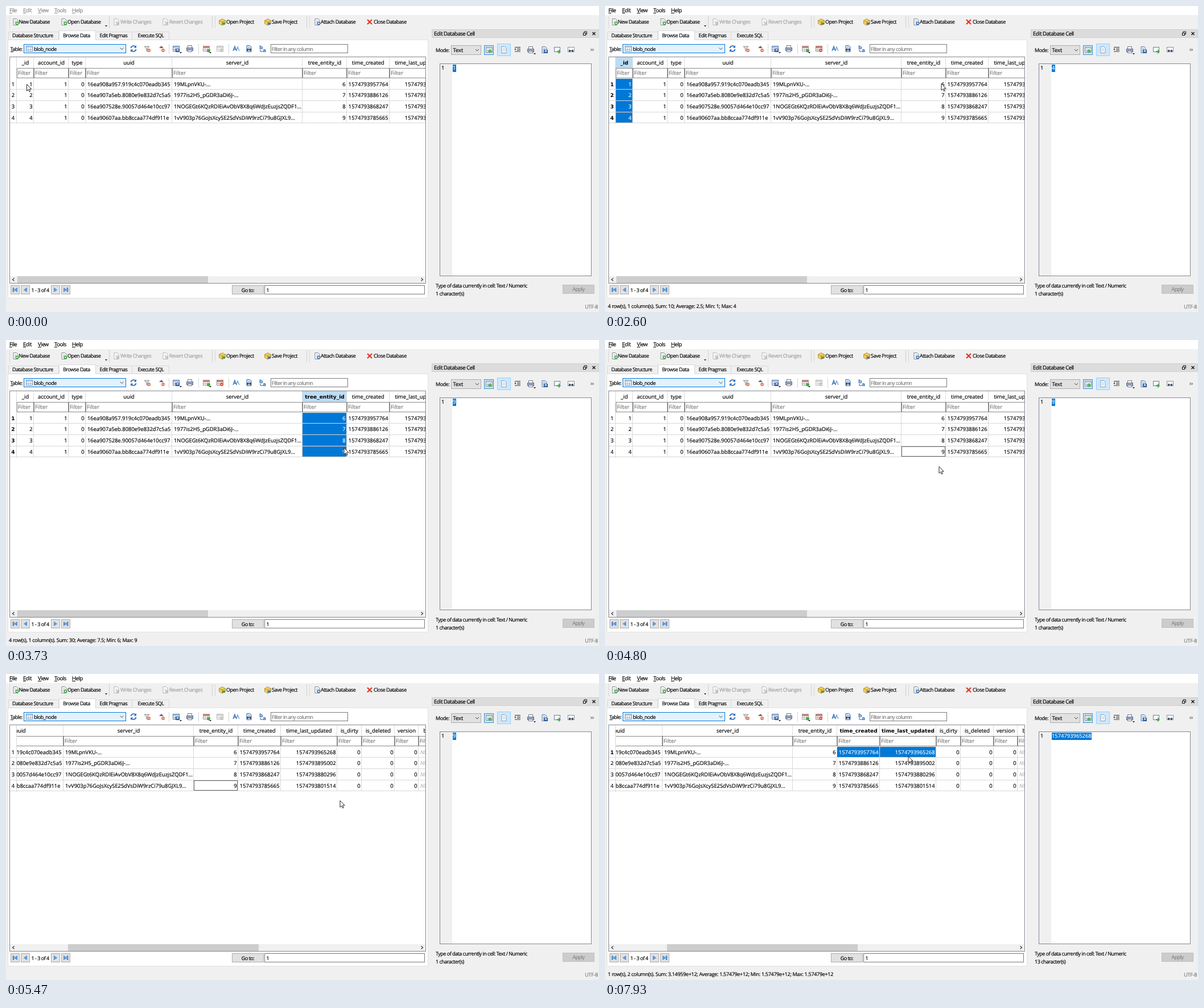
Write an HTML page that moves like this. It is 1042x538 px and loops after 8000 ms.

```html
<!DOCTYPE html>
<html lang="en">
<head>
<meta charset="utf-8">
<title>Database browser</title>
<style>
html, body { margin: 0; width: 100%; height: 100%; overflow: hidden; background: #f0f0f0; }
svg { display: block; width: 1042px; height: 538px; }
rect { shape-rendering: crispEdges; }
text { font: 9px "Open Sans", "Noto Sans", sans-serif; letter-spacing: -.5px; text-rendering: geometricPrecision; white-space: pre; stroke-width: .18px; }
.cell { font-size: 9.4px; letter-spacing: 0; }
.bold { font: bold 9px "DejaVu Sans", sans-serif; letter-spacing: 0; stroke-width: 0; }
.null { font-style: italic; }
.title { font-size: 9.6px; }
.status { letter-spacing: -.3px; }
</style>
</head>
<body>
<svg viewBox="0 0 1042 538">
  <defs><clipPath id="view"><rect x="19" y="90" width="718" height="385"/></clipPath></defs>
  <g id="base"></g>
  <g id="live"></g>
</svg>
<script>
const BLUE = '#0078d7', GREY = '#a0a0a0', FPS = 15, LOOP = 8000;

const box = (x, y, w, h, fill, line) => line
  ? `<rect x="${x + .5}" y="${y + .5}" width="${w - 1}" height="${h - 1}" fill="${fill}" stroke="${line}"/>`
  : `<rect x="${x}" y="${y}" width="${w}" height="${h}" fill="${fill}"/>`;
const label = (x, y, s, { fill = '#000', anchor = 'start', cls = '' } = {}) =>
  `<text x="${x}" y="${y + 3.4}" fill="${fill}" stroke="${fill}" text-anchor="${anchor}" class="${cls}">${s}</text>`;
const path = (d, line, width = 1, fill = 'none') =>
  `<path d="${d}" fill="${fill}" stroke="${line}" stroke-width="${width}"/>`;
const disc = (x, y, r, fill) => `<circle cx="${x}" cy="${y}" r="${r}" fill="${fill}"/>`;
const at = (x, y, body) => `<g transform="translate(${x} ${y})">${body}</g>`;
const chevron = (x, y) => path(`M${x - 3} ${y - 1.5}l3 3 3-3`, '#444');
const tri = (x, y) => path(`M${x - 2} ${y}h4l-2 2.5z`, 'none', 0, '#222');

// Icons, centred on 0,0
const page = (line = '#6b7f99', fill = '#fff') =>
  path('M-4-5.5h5.5l2.5 2.5v8.5h-8z', line, 1, fill) + path('M-2-2h4M-2 0h4M-2 2h4', line, .6);
const dbPage = mark => page('#7a8794') + disc(2.5, 2.5, 3, mark) + path('M1 2.5h3M2.5 1v3', '#fff', .9);
const cube = mark => path('M-5.5-2.5l5.5-3 5.5 3v5.5l-5.5 3-5.5-3z', '#a98222', .8, '#f5cf5a') +
  path('M-5.5-2.5l5.5 2.5 5.5-2.5M0 0v6', '#a98222', .8) + box(0, 1, 5, 4, mark);
const grid = (line, head) => box(-6, -5, 12, 10, '#fff', line) + box(-5, -4, 10, 3, head) +
  path('M-5 1.5h10M-2-1v5M2-1v5', line, .7);
const disk = box(-1, 0, 7, 6, '#4a78b8', '#2c5693') + box(1, 1, 3, 2, '#fff');
const printer = box(-6, -2, 12, 6, '#93a6c2', '#5a7093') + box(-4, -6, 8, 5, '#fff', '#778') + box(-4, 2, 8, 4, '#fff', '#778');
const funnel = path('M-5-4h9l-3.5 4v5l-2-1.5v-3.5z', '#777', .8, '#ddd');
const cross = path('M-4-4l8 8M4-4l-8 8', '#e03324', 2.2);
const refresh = path('M-4.5-1a4.7 4.7 0 0 1 8-2.5M4.5 1a4.7 4.7 0 0 1-8 2.5', '#2f6fbd', 1.8) +
  path('M5-6v4.5h-4.5zM-5 6v-4.5h4.5z', 'none', 0, '#2f6fbd');
const minus = color => disc(3, 3, 3, color) + path('M1.3 3h3.4', '#fff', 1);
const glasses = box(-4, 0, 3, 4, '#456') + box(1, 0, 3, 4, '#456') + box(-1, 1, 2, 1, '#456');

const columns = [
  ['_id', 19, 1], ['account_id', 49, 1], ['type', 110, 1], ['uuid', 140], ['server_id', 292],
  ['tree_entity_id', 521, 1], ['time_created', 599, 1], ['time_last_updated', 674, 1],
  ['is_dirty', 773, 1], ['is_deleted', 816, 1], ['version', 874, 1], ['blob_size', 916], ['', 973]
].map(([name, x, numeric], i, all) => ({ name, x, numeric, w: (all[i + 1] || [])[1] - x })).slice(0, -1);

const rows = [
  ['16ea908a957.919c4c070eadb345', '19MLpnVKU-...', 1574793957764, 1574793965268],
  ['16ea907a5eb.8080e9e832d7c5a5', '1977is2H5_pGDR3aDi6J-...', 1574793886126, 1574793895002],
  ['16ea907528e.90057d464e10cc97', '1NOGEGt6KQzRDlEiAvObV8X8q6WdJzEuzjsZQDF1...', 1574793868247, 1574793880296],
  ['16ea90607aa.bb8ccaa774df911e', '1vV903p76GoJsXcySE2SdVsDiW9rzCi79u8GJXL9...', 1574793785665, 1574793801514]
].map(([uuid, server, created, updated], i) => [i + 1, 1, 0, uuid, server, i + 6, created, updated, 0, 0, 0, null]);
const rowTop = r => Math.round(127.6 + r * 19.7);

// Selection steps: frame, first column, last column, last row (-1 = nothing selected)
const picks = [
  [0, 0, 0, -1], [12, 0, 0, 0], [15, 0, 0, 1], [17, 0, 0, 2], [20, 0, 0, 3],
  [45, 5, 5, 0], [50, 5, 5, 1], [53, 5, 5, 2], [56, 5, 5, 3], [72, 5, 5, -1],
  [113, 6, 6, 0], [117, 6, 7, 0]
];
// Pointer: frame, x, y, linear approach
const pointer = [
  [0, 36, 137], [12, 36, 137], [19, 38.5, 189, 1], [23, 37, 220, 1], [30, 37, 220], [39, 590.5, 136],
  [47, 590.5, 136], [56, 593.5, 189], [62, 593.5, 189], [65, 586.5, 222], [85, 586.5, 222], [96, 461, 137],
  [99, 461, 137], [100, 458, 136], [102, 453, 132], [106, 507, 139], [110, 465, 139],
  [115, 465, 139], [119, 532.5, 144]
];
const scroll = [[76, 0], [77, 26], [78, 66], [79, 110], [80, 151], [81, 179], [82, 191]];

function follow(keys, frame, i, linear) {
  const n = keys.findIndex(k => k[0] > frame);
  if (n === 0) return keys[0][i];
  if (n < 0) return keys[keys.length - 1][i];
  const a = keys[n - 1], b = keys[n];
  let p = (frame - a[0]) / (b[0] - a[0]);
  if (!(linear || b[3])) p = p * p * (3 - 2 * p);
  return a[i] + (b[i] - a[i]) * p;
}

function base() {
  let s = box(0, 0, 1042, 538, '#f0f0f0') + box(0, 0, 1042, 16, '#fff');
  const tools = [
    [17, 22.5, 'New Database', dbPage('#4aa84a')], [102, 108, 'Open Database', dbPage('#4aa84a')],
    [194, 201, 'Write Changes', page('#b5b5b5') + box(0, 0, 5, 5, '#c4c4c4'), GREY],
    [280, 287, 'Revert Changes', page('#b5b5b5') + path('M0 0l5 5M5 0l-5 5', '#b5b5b5', 1.3), GREY],
    [380, 387, 'Open Project', cube('#5a9e45')], [460, 467, 'Save Project', cube('#4a78b8')],
    [547, 553, 'Attach Database', dbPage('#4a78b8')], [639, 646, 'Close Database', cross]
  ];
  for (const [ix, x, name, icon, fill] of tools) s += at(ix, 28, icon) + label(x, 28, name, { fill });
  s += tri(176, 34);
  for (const x of [181, 362, 528]) s += box(x, 18, 1, 21, '#cfcfcf');
  for (const x of [6, 367, 533]) s += path(`M${x + .5} 19v19`, '#aaa').replace('/>', ' stroke-dasharray="1 2"/>');

  // Tabs and pane
  s += box(3, 59, 739, 455, '#fff', '#e2e2e2');
  for (const [x, w, c, name] of [[4, 89, 47, 'Database Structure'], [157, 65, 189, 'Edit Pragmas'], [221, 66, 254.5, 'Execute SQL']])
    s += box(x, 45, w, 15, '#f0f0f0', '#d9d9d9') + label(c, 52, name, { anchor: 'middle' });
  s += box(93, 43, 65, 17, '#fff', '#d9d9d9') + box(94, 59, 63, 1, '#fff') + label(124, 51.5, 'Browse Data', { anchor: 'middle' });

  // Table toolbar
  s += label(7.5, 75.5, 'Table:') + box(8, 80, 5, 1, '#000') + box(31, 67, 180, 16, '#e5f1fb', BLUE) +
    at(41, 75, grid('#7898bd', '#c4d8ee')) + label(49, 75.5, 'blob_node') + chevron(203.5, 75);
  s += at(224, 75, refresh) + at(248, 75, funnel + minus('#e3764c')) +
    at(273, 75, path('M-4-1l4-4 4 4z', 'none', 0, '#666') + minus('#e3764c')) +
    at(299, 75, grid('#5c7fab', '#a9c5e6') + disk) + tri(307, 81) + at(323, 75, printer) +
    at(352, 75, grid('#9a9a9a', '#e07a70') + disc(4, 3.5, 3, '#4aa84a')) + tri(359, 81) +
    at(404, 75, path('M-5 4l3-8 3 8M-4 1h4', '#2f6fbd', 1.4) + path('M1 4l2-7 3 7', '#6d9bd0', 1.3)) +
    at(427, 75, page('#2f6fbd', '#dceafa') + glasses) +
    at(451, 75, label(-6, -2, 'b', { cls: 'bold', fill: '#2f6fbd' }) + label(0, 3, 'a', { cls: 'bold', fill: '#2f6fbd' }) + path('M-4 2v3h4', '#555'));
  for (const x of [286, 338, 391]) s += box(x, 67, 1, 17, '#d4d4d4');
  s += box(465, 67, 136, 16, '#fff', '#7a7a7a') + label(467, 75.5, 'Filter in any column', { fill: '#777' });

  // Table frame and navigation
  s += box(6, 89, 732, 399, '#fff', '#828790');
  const nav = (x, d) => box(x, 491, 16, 16, '#e1e1e1', '#adadad') + at(x + 8, 499, path(d, '#2f6fbd', .6, '#5f9de6'));
  s += nav(8, 'M-4-3.5v7h2v-7zM3.5-3.5v7l-5-3.5z') + nav(26, 'M2.5-3.5v7l-5-3.5z') + label(44.5, 499.5, '1 - 3 of 4') +
    nav(79, 'M-2.5-3.5v7l5-3.5z') + nav(97, 'M4-3.5v7h-2v-7zM-3.5-3.5v7l5-3.5z');
  s += box(397, 491, 56, 16, '#e1e1e1', '#adadad') + label(425, 499.5, 'Go to:', { anchor: 'middle' }) +
    box(454, 491, 282, 16, '#fff', '#7a7a7a') + label(457.5, 499.5, '1');

  // Cell editor
  s += box(748, 41, 294, 15, '#dcdcdc', '#cfcfcf') + label(752, 49, 'Edit Database Cell', { cls: 'title' }) +
    box(1014, 47, 5, 5, 'none', '#111') + path('M1016 46.5v-1.5h4.5v4.5h-1.5', '#111') +
    path('M1030.5 46l5 5M1035.5 46l-5 5', '#111', 1.3);
  s += label(755, 78, 'Mode:') + box(782, 69, 53, 17, '#e1e1e1', '#adadad') + label(785.5, 78, 'Text', { cls: 'cell' }) + chevron(828, 77.5);
  s += box(840, 69, 17, 17, '#cce4f7', '#3d8fd1') + at(848.5, 77, grid('#8b9199', '#d5dbe2') + disc(2, 2.5, 3, '#5cb05c')) +
    box(863, 66, 24, 22, '#cce8ff', '#99d1ff') + at(875, 77, page('#8a9bb0')) +
    at(899, 77, path('M-5-4.5h10M-1-2h6M-1 .5h6M-5 3h10', '#333') + path('M-5-3l2.5 2-2.5 2z', 'none', 0, '#333')) +
    at(922, 77, printer) + tri(929, 83) + at(946, 77, page('#5c7fab', '#dceafa') + disk) +
    at(969, 77, box(-6, -5, 11, 9, '#fff', '#5c7fab') + path('M-1 2h3v-3l4 4.5-4 4v-3h-3z', 'none', 0, '#4aa84a')) +
    at(993, 77, box(-6, -5, 12, 9, '#fff', '#8a8f96') + glasses);
  s += path('M1027.5 75l2 2-2 2M1030.5 75l2 2-2 2', '#333');
  s += box(762, 101, 267, 374, '#fff', '#828790') + box(763, 102, 21, 372, '#f0f0f0') + label(765, 109, '1', { cls: 'cell' });
  s += label(755, 491.5, 'Type of data currently in cell: Text / Numeric') + box(978, 490, 56, 16, '#ccc', '#bfbfbf') +
    label(1006, 498, 'Apply', { anchor: 'middle', fill: '#838383' });
  return s + label(1040, 529, 'UTF-8', { anchor: 'end', fill: '#777', cls: 'status' });
}

const short = v => v < 1e6 ? String(+v.toPrecision(6)) : v.toPrecision(6);

function statusText(c0, c1, r1) {
  const values = rows.slice(0, r1 + 1).flatMap(r => r.slice(c0, c1 + 1));
  if (values.length < 2) return '';
  const sum = values.reduce((a, b) => a + b);
  return `${r1 + 1} row(s), ${c1 - c0 + 1} column(s). Sum: ${short(sum)}; Average: ${short(sum / values.length)}; ` +
    `Min: ${short(Math.min(...values))}; Max: ${short(Math.max(...values))}`;
}

function table(c0, c1, r1, current, active) {
  let s = '';
  columns.forEach(({ name, x, w, numeric }, c) => {
    const inCols = r1 >= 0 && c >= c0 && c <= c1;
    if (inCols && r1 === 3) s += box(x, 90, w, 19, '#bcdcf4');
    s += label(x + w / 2, 100, name, { anchor: 'middle', cls: inCols ? 'bold' : 'cell' });
    s += box(x + w - 1, 90, 1, 19, '#dcdcdc') + box(x, 109, w, 18, '#fff', '#8a8a8a') +
      label(x + 2, 118, 'Filter', { cls: 'cell', fill: '#777' });
    rows.forEach((row, r) => {
      const y = rowTop(r), h = rowTop(r + 1) - y, on = inCols && r <= r1;
      s += box(x + w - 1, y, 1, h, '#d8d8d8') + box(x, y + h - 1, w, 1, '#d8d8d8');
      if (on) s += box(x, y, w - 1, h - 1, BLUE);
      if (active && c === current[0] && r === current[1])
        s += box(x, y, w - 1, h - 1, 'none', on ? '#2f76b4' : '#666');
      const fill = on ? '#fff' : '#000', cy = y + 9.5;
      s += row[c] === null ? label(x + 3, cy, 'NULL', { cls: 'cell null', fill: '#b4b4b4' })
        : numeric ? label(x + w - 2.5, cy, row[c], { cls: 'cell', anchor: 'end', fill })
        : label(x + 3, cy, row[c], { cls: 'cell', fill });
    });
  });
  return s;
}

function live(frame) {
  const [, c0, c1, r1] = picks.filter(p => p[0] <= frame).pop();
  const active = frame >= 12, offset = follow(scroll, frame, 1, true);
  const current = [c1, r1 < 0 ? (active ? 3 : 0) : r1];
  let s = '';
  for (const [x, name, w] of [[6, 'File', 5], [30, 'Edit', 5], [56, 'View', 6], [85, 'Tools', 5], [116, 'Help', 6]]) {
    const fill = active ? '#000' : '#8a8a8a';
    s += label(x, 8, name, { fill, cls: 'title' }) + box(x, 12, w, 1, fill);
  }
  const canDelete = r1 >= 0;
  s += at(376, 75, grid(canDelete ? '#8a8a8a' : '#bbb', canDelete ? '#e07a70' : '#d8d8d8') + minus(canDelete ? '#e04a2c' : '#bbb'));

  s += `<g clip-path="url(#view)">${at(-offset, 0, table(c0, c1, r1, current, active))}</g>`;
  s += box(18, 90, 1, 117, '#d8d8d8');
  rows.forEach((_, r) => {
    s += label(12.5, rowTop(r) + 9.5, r + 1, { anchor: 'middle', cls: r <= r1 ? 'bold' : 'cell' }) +
      box(7, rowTop(r + 1) - 1, 12, 1, '#d8d8d8');
  });
  s += box(7, 475, 730, 12, '#f0f0f0') + box(Math.round(20 + offset * .466), 475, 335, 12, '#cdcdcd') +
    path('M14.5 478.5l-3 2.5 3 2.5M729.5 478.5l3 2.5-3 2.5', '#333', 1.2);

  const value = String(rows[current[1]][current[0]]);
  s += box(785, 103, Math.round(5.38 * value.length + .4), 13, BLUE) + label(785, 109, value, { cls: 'cell', fill: '#fff' });
  s += label(755, 506, `${value.length} character(s)`) + label(5, 528, statusText(c0, c1, r1), { cls: 'status' });

  return s + at(follow(pointer, frame, 1), follow(pointer, frame, 2),
    path('M.5.5v11.8l2.7-2.5 1.8 4 1.8-.8-1.8-3.900h3.7z', '#111', .9, '#fff'));
}

document.getElementById('base').innerHTML = base();
const stage = document.getElementById('live'), start = performance.now();
let shown = -1;
function tick() {
  const time = (performance.now() - start) % LOOP;
  const frame = Math.min(Math.floor((time + 4) * FPS / 1000), LOOP * FPS / 1000 - 1);
  if (frame !== shown) stage.innerHTML = live(shown = frame);
  requestAnimationFrame(tick);
}
tick();
</script>
</body>
</html>
```
